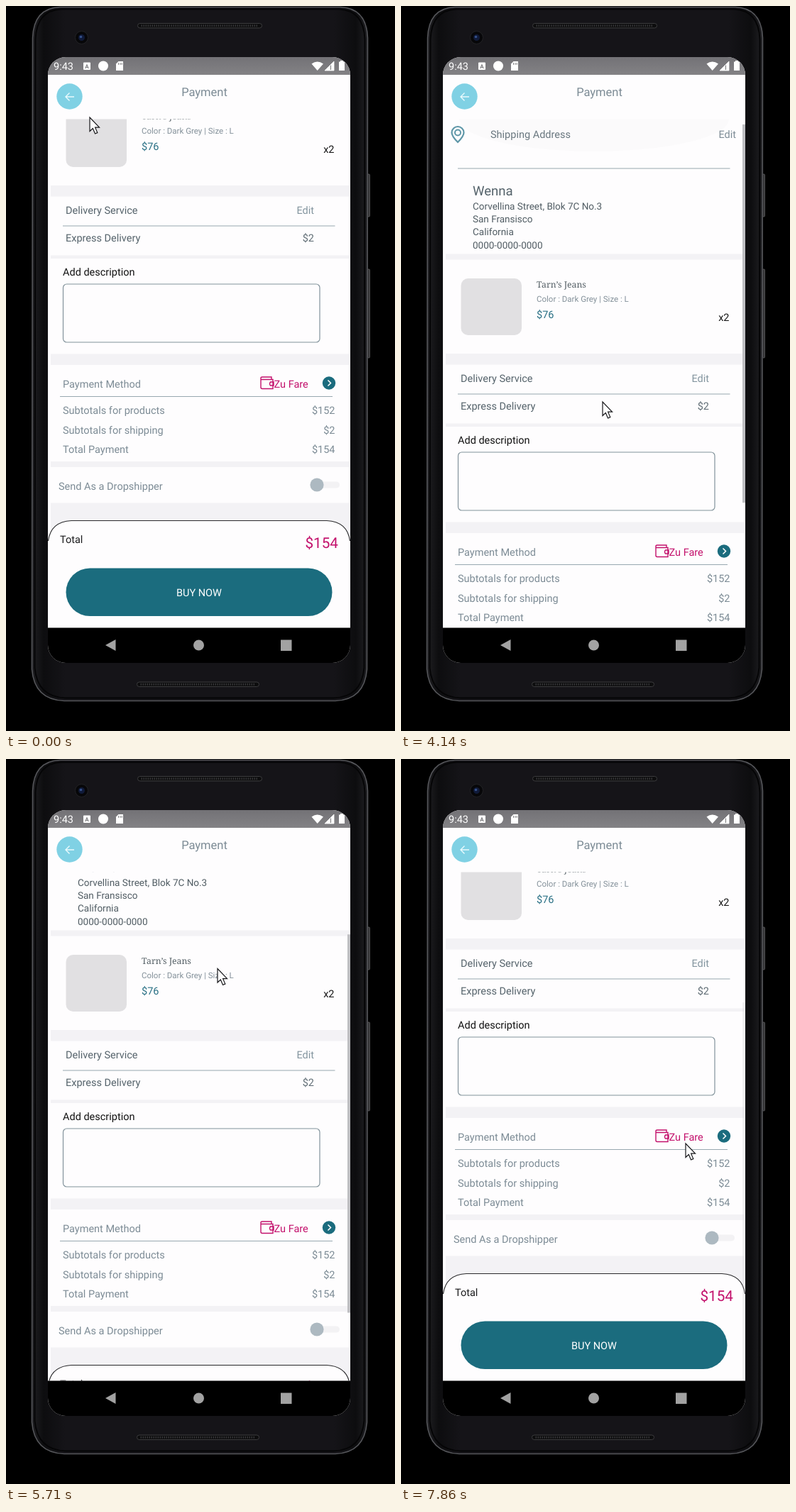
Write an HTML page that moves like this. It is 548 px wide and 1022 px high and loops after 8000 ms.

```html
<!DOCTYPE html>
<html lang="en">
<head>
<meta charset="utf-8">
<title>Payment screen</title>
<style>
html, body { margin: 0; width: 100%; height: 100%; overflow: hidden; background: #000; }
svg { display: block; width: 548px; height: 1022px; }
text { font-family: Roboto, Arial, sans-serif; font-size: 14.5px; text-rendering: geometricPrecision; white-space: pre; }
.slab { font-family: "Noto Serif", serif; }
</style>
</head>
<body>
<svg id="stage" viewBox="0 0 548 1022" xmlns="http://www.w3.org/2000/svg"></svg>
<script>
const LOOP = 8000, STEPS_PER_SECOND = 7, LAST_STEP = 55;
const VIEW_TOP = 159.5, VIEW_HEIGHT = 717, MAX_SCROLL = 247;
const BAND = '#f3f2f5', RULE = '#98a8b0', MUTED = '#7c8b95', DARK = '#55636b',
  TEAL = '#1b6c7e', PINK = '#c3116c', WHITE = '#fefdfe';

const rect = (x, y, w, h, fill, rest = '') =>
  `<rect x="${x}" y="${y}" width="${w}" height="${h}" fill="${fill}" ${rest}/>`;
const circle = (x, y, r, fill, rest = '') =>
  `<circle cx="${x}" cy="${y}" r="${r}" fill="${fill}" ${rest}/>`;
const path = (d, fill, stroke = 'none', width = 1, rest = '') =>
  `<path d="${d}" fill="${fill}" stroke="${stroke}" stroke-width="${width}" ${rest}/>`;
const text = (x, y, str, fill, size = 14.5, anchor = 'start', rest = '') =>
  `<text x="${x}" y="${y}" fill="${fill}" text-anchor="${anchor}" style="font-size:${size}px" ${rest}>${str}</text>`;
const right = (x, y, str, fill, size) => text(x, y, str, fill, size, 'end');
const band = (y, h) => rect(63, y, 420, h, BAND);
const rule = (x1, x2, y) => path(`M${x1} ${y}H${x2}`, 'none', RULE, 1.2);

function phone() {
  const grille = (x, y, w) => rect(x, y, w, 6.5, '#0d0d0e', 'rx="3.2" stroke="#3c3c3e"') +
    path(`M${x + 5} ${y + 3.2}H${x + w - 5}`, 'none', '#343436', 3, 'stroke-dasharray="1.5 1.5"');
  const sideKey = (y, h) => rect(509.5, y, 3, h, '#343436', 'rx="1.2" stroke="#69696b" stroke-width=".7"');
  return rect(0, 0, 548, 1022, '#000') +
    sideKey(237, 60) + sideKey(371, 125) +
    path('M76 1.5H471Q508 3 509.5 45L508.500 935Q505 978 464 979.500H82Q40 978 36.500 935L37.500 45Q39 3 76 1.500Z',
      'url(#shell)', '#55565a', 1.6) +
    path('M78 4.500H469Q504 6 505.500 47L504.500 933Q501 974 462 975.500H84Q44 974 40.500 933L41.500 47Q43 6 78 4.500Z',
      'none', '#050506', 2) +
    grille(185.500, 24.500, 175) + grille(184.500, 953, 172) +
    circle(106.500, 44.500, 9, '#070709', 'stroke="#222225"') +
    circle(106.500, 44.500, 4.500, '#101a38') + circle(105.500, 43.500, 1.800, '#35518b');
}

function statusBar() {
  return rect(59, 72, 426, 25, 'url(#status)') +
    text(67, 90, '9:43', '#fff') +
    rect(109, 79.500, 10, 10.500, '#fff', 'rx="1"') +
    text(114, 88, 'A', '#77777a', 8, 'middle', 'font-weight="700"') +
    circle(137, 84.500, 7, '#fff') +
    path('M158.500 78H165V91H155V81.500Z', '#fff') +
    path('M158.500 80V83M161 80V83M163.200 80V83', 'none', '#77777a', .9) +
    path('M430.500 81.500Q438.500 75.500 447 81.500L438.700 91Z', '#fff') +
    path('M449 91L462 78V91Z', '#fff', '#fff', .8) +
    path('M457.500 83.500V90', 'none', '#77777a', 1) +
    path('M471 78.500V77H475V78.500H477V91H469V78.500Z', '#fff');
}

function header() {
  return text(279.500, 127, 'Payment', MUTED, 16.5, 'middle') +
    circle(89.500, 127.500, 18.200, '#80d1e4') +
    path('M96 128H84M89.500 122.500L84 128L89.500 133.500', 'none', '#e9fafd', 1.4);
}

function addressSection() {
  const lines = ['Corvellina Street, Blok 7C No.3', 'San Fransisco', 'California', '0000-0000-0000'];
  return band(158, 10) +
    path('M80 202Q71.500 193.500 71.500 188.500A8.500 8.500 0 0 1 88.500 188.500Q88.500 193.500 80 202Z', 'none', '#5f97a8', 2.2) +
    circle(80, 188.500, 4, 'none', 'stroke="#5f97a8" stroke-width="2"') +
    text(126, 196, 'Shipping Address', '#6a7880') +
    right(472, 196, 'Edit', MUTED) + rule(80, 463.500, 239) +
    text(101, 276.500, 'Wenna', DARK, 18.6) +
    lines.map((s, i) => text(101, 296.500 + i * 18.400, s, '#505c63', 13.5)).join('') +
    band(359.500, 8);
}

function productSection() {
  return rect(84.500, 394, 85.500, 80, '#e1e0e2', 'rx="10"') +
    text(191, 407, 'Tarn’s Jeans', '#535e64', 12.2, 'start', 'class="slab"') +
    text(191, 427, 'Color : Dark Grey | Size : L', '#84919a', 11.5) +
    text(191, 450, '$76', '#286f84') + right(462.500, 454, 'x2', '#161616') +
    band(500, 15.500);
}

function deliverySection() {
  return text(84, 539.500, 'Delivery Service', DARK) + right(434, 539.500, 'Edit', '#82949e') +
    rule(80, 463.500, 557) +
    text(84, 579, 'Express Delivery', DARK) + right(434, 579, '$2', '#606d75') +
    band(598.500, 4.500) +
    text(80, 626.500, 'Add description', '#111') +
    rect(80.500, 639, 361.500, 82, 'none', 'rx="5" stroke="#82939b" stroke-width="1.2"') +
    band(737.500, 15.500);
}

function paymentSection() {
  const sums = [['Subtotals for products', '$152'], ['Subtotals for shipping', '$2'], ['Total Payment', '$154']];
  return text(80, 785, 'Payment Method', MUTED) +
    path('M359 771.500Q359 770 361 770H374V773.500H376V786.500H361Q359 786.500 359 784.500ZM359 773.500H375M377 777H372.500Q370.500 779.500 372.500 782H377Z',
      'none', PINK, 1.4) +
    text(377.500, 785, 'Zu Fare', PINK) +
    circle(455, 778.500, 9.200, TEAL) +
    path('M453.500 774.500L457.500 778.500L453.500 782.500', 'none', '#fff', 1.5) +
    rule(76, 460, 797.500) +
    sums.map(([label, sum], i) => {
      const y = 822 + i * 27.5;
      return text(80, y, label, MUTED) + right(463.500, y, sum, MUTED);
    }).join('') +
    band(889, 8) +
    text(74, 928.500, 'Send As a Dropshipper', MUTED) +
    rect(430, 917.500, 40, 9, '#f3f2f4', 'rx="4.500"') + circle(438, 922, 9.600, '#adb9c1') +
    band(947.500, 60);
}

function totalCard() {
  return path('M59 1130V1003Q62 974 92 972.500H452Q482 974 485 1003V1130Z', WHITE) +
    path('M59.500 1001Q63 974 92 972.500H452Q481 974 484.500 1001', 'none', '#29292b', 1.2) +
    text(76, 1004, 'Total', '#1c1c1e') +
    right(468, 1011, '$154', PINK, 20.7) +
    rect(84.500, 1039.500, 375, 67.500, TEAL, 'rx="33.7"') +
    text(272, 1078.500, 'BUY NOW', '#fff', 14.5, 'middle');
}

function navBar() {
  return rect(59, 876.500, 426, 50, '#000') +
    path('M140 901L154.500 893V909Z', '#a2a2a2') +
    circle(271.500, 901, 7.500, '#a2a2a2') +
    rect(387, 893.500, 15.500, 15.500, '#a2a2a2');
}

document.getElementById('stage').innerHTML = `
  <defs>
    <linearGradient id="shell">
      <stop offset="0" stop-color="#202023"/><stop offset=".035" stop-color="#0d0d0f"/>
      <stop offset=".1" stop-color="#151418"/><stop offset=".9" stop-color="#151418"/>
      <stop offset=".965" stop-color="#0d0d0f"/><stop offset="1" stop-color="#202023"/>
    </linearGradient>
    <linearGradient id="status" x2="0" y2="1">
      <stop offset="0" stop-color="#737276"/><stop offset="1" stop-color="#838285"/>
    </linearGradient>
    <clipPath id="screen"><rect x="59" y="72" width="426" height="854" rx="25"/></clipPath>
    <clipPath id="view"><rect x="59" y="${VIEW_TOP}" width="426" height="${VIEW_HEIGHT}"/></clipPath>
  </defs>
  ${phone()}
  <g clip-path="url(#screen)">
    ${rect(59, 72, 426, 854, WHITE)}
    ${statusBar()}${header()}
    <g clip-path="url(#view)">
      <g id="content">
        ${addressSection()}${productSection()}${deliverySection()}${paymentSection()}${totalCard()}
      </g>
      <ellipse id="glow" cx="272" cy="160" rx="190" ry="45"/>
      <rect id="bar" x="481" width="4" fill="#bfbfc2"/>
    </g>
    ${navBar()}
  </g>
  <g id="cursor">${path('M0 0V19.500L4.300 15.500L7.500 23L10.800 21.600L7.600 14.200H13.500Z', '#fff', '#17171a', 1.2)}</g>`;

// step, distance pulled down from the end, pointer x, pointer y
const keys = [
  [0, 0, 118, 157], [2, 0, 118, 157], [14, 0, 318, 760], [24, 0, 297, 610],
  [25.5, 0, 290, 310], [29, 237, 284, 558], [30, 247, 284, 572],
  [37, 247, 305, 421], [38, 247, 305, 421], [42, 11, 291, 170], [43, 0, 290, 150],
  [46, 0, 298, 290], [49, 247, 300, 545], [51.5, 0, 304, 285], [55, 0, 401, 542]
];
const drags = [[25.5, 30], [38, 43], [46, 51.5]];
const clamp = v => Math.max(0, Math.min(1, v));

function poseAt(step) {
  const i = Math.max(1, keys.findIndex(k => k[0] >= step));
  const a = keys[i - 1], b = keys[i];
  const p = (step - a[0]) / (b[0] - a[0]);
  return a.map((v, n) => v + (b[n] - v) * p);
}

// The bar rests for 300 ms after a drag, then fades for 250 ms.
function barOpacity(step) {
  const drag = drags.filter(d => step > d[0]).pop();
  if (!drag) return 0;
  const idle = (step - drag[1]) * 1000 / STEPS_PER_SECOND;
  return clamp(1 - (idle - 300) / 250);
}

const [content, glow, bar, cursor] = ['content', 'glow', 'bar', 'cursor'].map(id => document.getElementById(id));
const ratio = VIEW_HEIGHT / (VIEW_HEIGHT + MAX_SCROLL);
bar.setAttribute('height', VIEW_HEIGHT * ratio);

function draw(ms) {
  const step = Math.min(LAST_STEP, Math.floor((ms + 10) * STEPS_PER_SECOND / 1000));
  const [, pulled, x, y] = poseAt(step);
  const scroll = MAX_SCROLL - pulled;
  content.setAttribute('transform', `translate(0 ${-scroll})`);
  bar.setAttribute('y', VIEW_TOP + scroll * ratio);
  bar.setAttribute('opacity', barOpacity(step));
  glow.setAttribute('opacity', 0.02 * clamp(1 - Math.abs(step - 30) / 3));
  cursor.setAttribute('transform', `translate(${x} ${y})`);
  cursor.setAttribute('visibility', step < 2 || step >= 14 ? 'visible' : 'hidden');
}

const start = performance.now();
function tick() {
  draw((performance.now() - start) % LOOP);
  requestAnimationFrame(tick);
}
tick();
</script>
</body>
</html>
```
